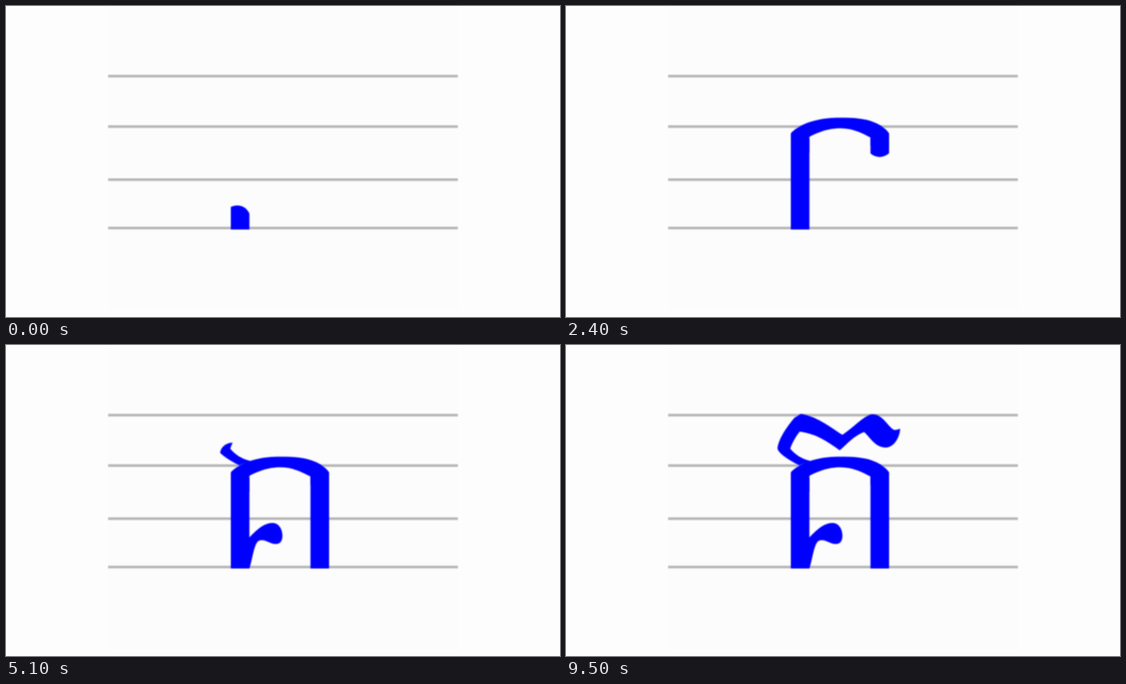
An HTML page for the animation above (9700 ms loop, 998 px wide and 561 px high).

```html
<!DOCTYPE html>
<html lang="en">
<head>
<meta charset="utf-8">
<title>Letter stroke order</title>
<style>
  html, body { margin: 0; width: 100%; height: 100%; overflow: hidden; background: #fdfdfd; }
  svg { display: block; width: 998px; height: 561px; }
  .rules { stroke: #b3b3b3; stroke-width: 4.6; }
  .ink path {
    fill: none; stroke: #00f; stroke-width: 48;
    stroke-linecap: round; stroke-linejoin: round;
    stroke-dasharray: 1 2; visibility: hidden;
  }
  .ink .fine path { stroke-width: 43; }
</style>
</head>
<body>
<svg viewBox="0 0 998 561">
  <defs>
    <filter id="soft" filterUnits="userSpaceOnUse" x="0" y="0" width="998" height="561" color-interpolation-filters="sRGB">
      <feGaussianBlur stdDeviation="1.1"/>
    </filter>
    <clipPath id="arch">
      <path d="M405 403V230C409 224 424 214 440 209C462 202 480 201.5 494 201.5C520 201.5 537 203 553 209C566 214 577 222 582 230V403H548.5V237C530 228 515 220.5 494 220.5C470 220.5 450 230 438.5 236V403Z"/>
    </clipPath>
    <clipPath id="foot">
      <path d="M430 353L436 350C446 339 462 321 480 321C492 321 498 333 498 344C498 353 494 359 486 359C476 359 470 352 460 352C448 352 447 372 439 402H430Z"/>
    </clipPath>
    <clipPath id="crest">
      <path d="M440 209C425 206 412 197 404 187C407 177 414 165 421 156C447 159 470 173 493 190C505 180 518 164 537 157C546 164 556 185 576 185C590 185 601 168 602 151C598 152 592 155 589 152C578 144 570 125 552 125C538 126 520 147 498 162C478 150 455 130 424 124.5Q417 124 414 128C402 143 384 165 381 186C381 194 400 207 420 217Z"/>
    </clipPath>
  </defs>
  <rect x="184" width="630" height="548" fill="#fcfcfc"/>
  <path class="rules" filter="url(#soft)" d="M184 126.5H814M184 217.5H814M184 313.2H814M184 400.5H814"/>

  <!-- Wide pen strokes, each seen only inside its part of the letter. -->
  <g class="ink" filter="url(#soft)">
    <g clip-path="url(#arch)">
      <path pathLength="1" data-from="-220" data-to="1100" d="M416 410L418 252"/>
      <path pathLength="1" data-from="1100" data-to="2270" d="M418 252L440 222L490 211L535 221L565 233"/>
      <path pathLength="1" data-from="2270" data-to="3600" d="M565 233V391"/>
    </g>
    <g clip-path="url(#foot)">
      <path pathLength="1" data-from="3700" data-to="4600" d="M424 410L431 377L450 350L484 340"/>
    </g>
    <g class="fine" clip-path="url(#crest)">
      <path pathLength="1" data-from="4700" data-to="5900" d="M440 218L394 190L408 158L432 144"/>
      <path pathLength="1" data-from="5900" data-to="7500" d="M432 144L495 174L545 143H552L577 168L592 162"/>
    </g>
  </g>
</svg>
<script>
  const LOOP = 9700, STEP = 100;
  const strokes = document.querySelectorAll('.ink path');
  const start = performance.now();

  function draw() {
    const t = Math.floor((performance.now() - start) % LOOP / STEP) * STEP;
    for (const { dataset, style } of strokes) {
      const from = +dataset.from, to = +dataset.to;
      const done = Math.min((t - from) / (to - from), 1);
      style.visibility = done > 0 ? 'visible' : 'hidden';
      style.strokeDashoffset = 1 - Math.max(done, 0);
    }
    requestAnimationFrame(draw);
  }
  draw();
</script>
</body>
</html>
```
